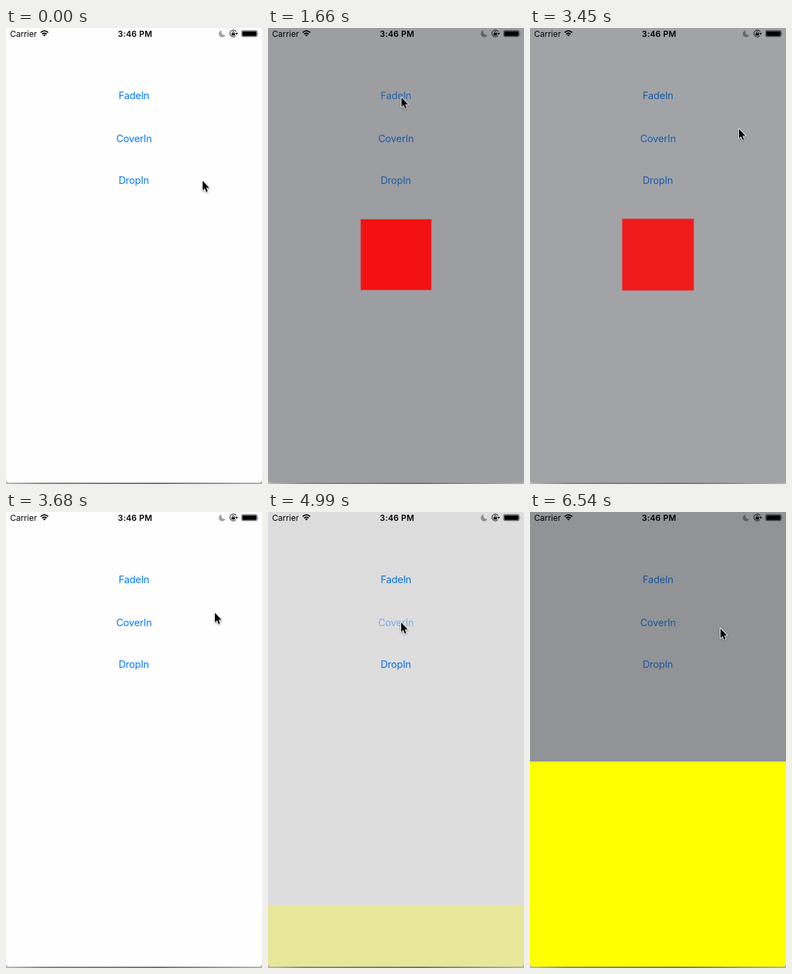
An HTML page that plays this animation: 375 px wide and 667 px high, repeating every 8 s.

```html
<!DOCTYPE html>
<html lang="en">
<head>
<meta charset="utf-8">
<title>Popup transitions</title>
<style>
  html, body { margin: 0; width: 100%; height: 100%; overflow: hidden; background: #fefefe; }
  svg { display: block; width: 375px; height: 667px; }
  text { font-family: Inter, Roboto, sans-serif; }
  .button { font-size: 14.5px; letter-spacing: -.2px; fill: #007aff; text-anchor: middle; }
  .status { font-size: 12px; }
  .clock { font-weight: 600; text-anchor: middle; letter-spacing: .2px; }
  .line { fill: none; stroke: #000; }
  #square { transform-origin: 187.5px 331.5px; }
  #dim, #square, #sheet { opacity: 0; }
</style>
</head>
<body>
<svg viewBox="0 0 375 667">
  <defs>
    <linearGradient id="edge">
      <stop offset="0" stop-color="#b8b8b8"/>
      <stop offset=".15" stop-color="#858585"/>
      <stop offset=".6" stop-color="#727272"/>
      <stop offset="1" stop-color="#b0b0b0"/>
    </linearGradient>
    <clipPath id="screen"><path d="M0 0H375V660Q375 665 370 665H5Q0 665 0 660Z"/></clipPath>
  </defs>

  <rect y="655" width="375" height="12" fill="url(#edge)"/>
  <g clip-path="url(#screen)">
    <rect width="375" height="667" fill="#fefefe"/>
    <text id="fade" class="button" x="187.5" y="103.5">FadeIn</text>
    <text id="cover" class="button" x="187.5" y="166.5">CoverIn</text>
    <text class="button" x="187.2" y="227.5">DropIn</text>
    <rect id="dim" width="375" height="667" fill="rgb(49,51,60)"/>
    <rect id="square" x="137.5" y="281.5" width="100" height="100" fill="#f00"/>
    <rect id="sheet" y="365" width="375" height="302" fill="#ff0"/>
  </g>

  <g class="status">
    <text x="6" y="12.5">Carrier</text>
    <text class="clock" x="189" y="12.5">3:46 PM</text>
    <g class="line" stroke-width="1.8">
      <path d="M50.8 6.7Q56.3 1.6 61.8 6.7"/>
      <path d="M53 9Q56.3 6.1 59.6 9"/>
    </g>
    <path d="M54.3 10.3Q56.3 8.9 58.3 10.3L56.3 12.5Z"/>
    <path d="M315.6 3.6A5 5 0 1 0 321.3 10.3A5.2 5.2 0 0 1 315.6 3.6Z" opacity=".36"/>
    <path class="line" d="M337.4 5.6A5 5 0 1 0 336.5 11.6"/>
    <path d="M335.6 7.2H340L337.8 10Z"/>
    <rect x="330.4" y="7.4" width="5" height="3.6" rx=".4"/>
    <path class="line" d="M331.5 7.6V6.6A1.4 1.4 0 0 1 334.3 6.6V7.6" stroke-width=".9"/>
    <rect class="line" x="345.2" y="3.7" width="22.6" height="9" rx="1.6" stroke-width=".6"/>
    <rect x="346.2" y="4.7" width="20.6" height="7" rx=".8"/>
    <path d="M368.7 6.5Q370.1 8.2 368.7 9.9Z"/>
  </g>

  <g id="cursor">
    <path d="M0 0V14L3.2 11.1L5.2 16.2L7.5 15.2L5.4 10.3H9.8Z" stroke="#fff" stroke-width="2"
      stroke-linejoin="round" paint-order="stroke" style="filter:drop-shadow(0 1px 1px rgba(0,0,0,.4))"/>
  </g>
</svg>
<script>
const LOOP = 8000;
const STEP = 118;

// Rows are [time, value]; every pose holds until the next row.
function play(id, rows, toStyle) {
  const frames = rows.map(([time, value]) =>
    ({ offset: time / LOOP, easing: 'steps(1, end)', ...toStyle(value) }));
  frames.push({ ...frames[frames.length - 1], offset: 1 });
  document.getElementById(id).animate(frames, { duration: LOOP, iterations: Infinity });
}

const smooth = x => x * x * (3 - 2 * x);

function glide(start, steps, from, to) {
  return Array.from({ length: steps }, (_, i) => {
    const p = smooth((i + 1) / steps);
    return [start + Math.round(i * STEP), from.map((a, k) => a + (to[k] - a) * p)];
  });
}

const rest = [288, 223.5], nearFade = [194, 112], onFade = [195.5, 101.5];
const asideFade = [306, 147.5], onCover = [195, 161.5], asideCover = [279, 170.5];

play('cursor', [
  [0, rest],
  ...glide(120, 7, rest, nearFade),
  ...glide(950, 2, nearFade, onFade),
  ...glide(2140, 4, onFade, asideFade),
  ...glide(3920, 4, asideFade, onCover),
  ...glide(5940, 6, onCover, asideCover)
], ([x, y]) => ({ transform: `translate(${x}px, ${y}px)` }));

const alert = [[0, 0], [1550, .3], [1660, .885], [1780, 1], [3450, .835], [3560, .25], [3680, 0]];
const sheet = [[0, 0], [4990, .3], [5100, .885], [5220, 1]];
const opacity = value => ({ opacity: value });

play('dim', [...alert, ...sheet.slice(1)], p => opacity(.53 * p));
play('square', alert, p => ({ opacity: p, transform: `scale(${1 + .3 * (1 - p)})` }));
play('sheet', sheet, p => ({ opacity: p, transform: `translateY(${300 * (1 - p)}px)` }));
play('fade', [[0, 1], [1430, .2], [1550, .45], [1660, .9], [1780, 1]], opacity);
play('cover', [[0, 1], [4760, .2], [4990, .45], [5100, .9], [5220, 1]], opacity);
</script>
</body>
</html>
```
